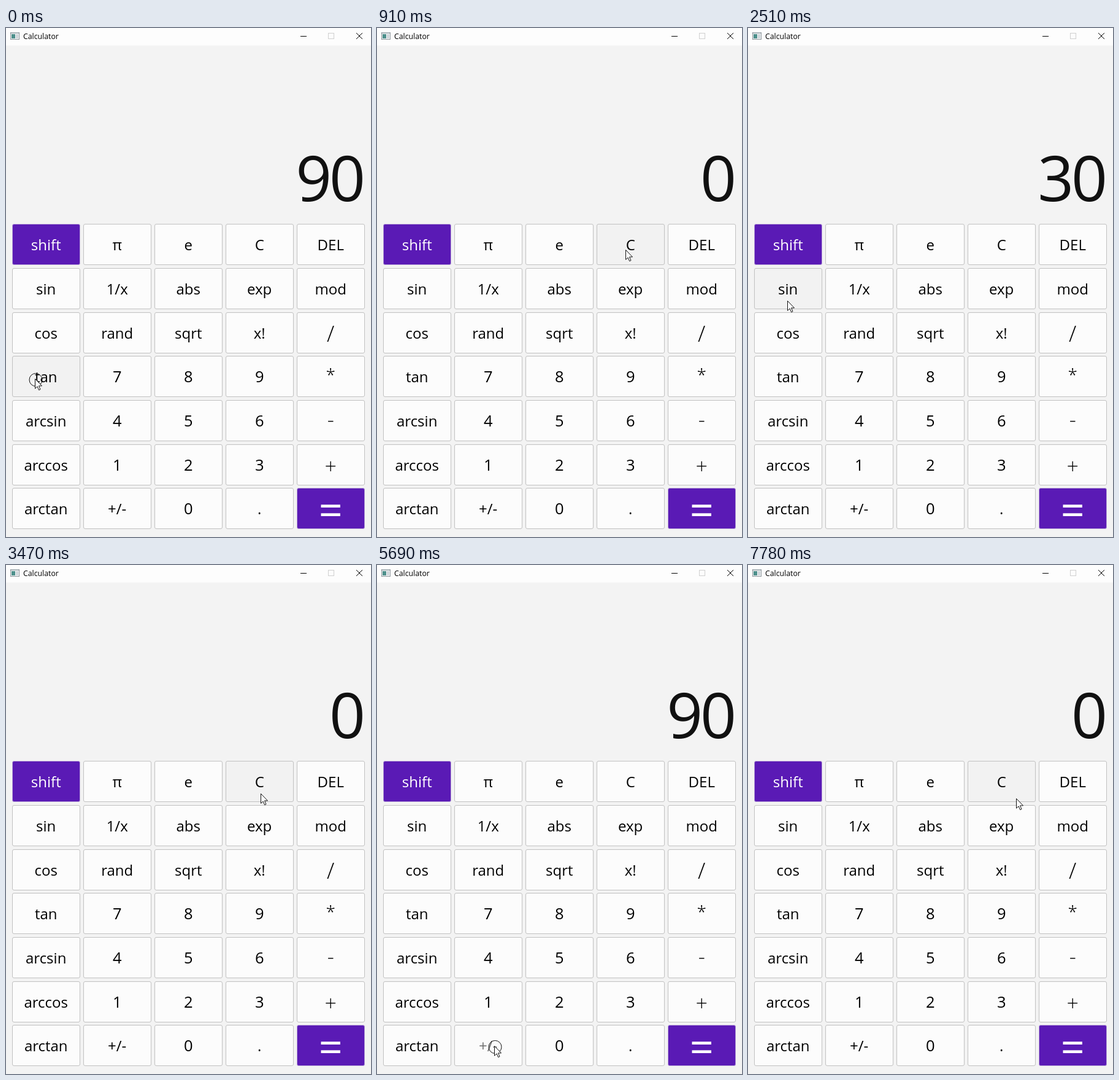
Recreate the animation shown at these times as an HTML page. Size 595 px wide and 829 px high, loop 8000 ms.

```html
<!DOCTYPE html>
<html lang="en">
<head>
<meta charset="utf-8">
<title>Calculator</title>
<style>
  html, body { margin: 0; width: 100%; height: 100%; overflow: hidden; background: #f3f3f3; }
  svg { display: block; width: 595px; height: 829px; font-family: "Open Sans", "Noto Sans", sans-serif; }
  .key rect { fill: #fcfcfc; stroke: #c1c1c1; }
  .key text { fill: #000; font-size: 24px; text-anchor: middle; }
  .key .digit { font-size: 25.5px; }
  .key .op { font-weight: 300; }
  .key.hover rect { fill: #f2f2f2; }
  .key.down rect { fill: #fbfbfb; }
  .key.down text { fill: #737373; }
  .key.accent rect { fill: #5a1ab5; stroke: #b9a3d8; }
  .key.accent text { fill: #fff; font-weight: 400; }
  .key.off text { fill: #a0a0a0; }
  .key.accent.off rect { fill: #cdcdcd; stroke: #cdcdcd; }
  .key.accent.off text { fill: #fff; }
  #display { fill: #111; font-size: 103px; letter-spacing: -4px; text-anchor: end; }
</style>
</head>
<body>
<svg viewBox="0 0 595 829">
  <rect width="595" height="829" fill="#f3f3f3"/>
  <rect width="595" height="28.5" fill="#fdfdfd"/>
  <g>
    <rect x="7.5" y="7.5" width="14" height="11" fill="#f4f6f7" stroke="#8b9499"/>
    <rect x="8" y="7" width="13" height="2" fill="#a9b3b8"/>
    <rect x="9" y="10" width="6" height="7" fill="#4d8f8b"/>
    <rect x="16" y="10" width="4" height="7" fill="#cfd6da"/>
  </g>
  <text x="28" y="18" font-size="12.3">Calculator</text>
  <g fill="none" stroke="#000">
    <path d="M480 13.5h10"/>
    <rect x="525.5" y="8.5" width="9" height="9" stroke="#d0d0d0"/>
    <path d="M571 8l10 10m0-10l-10 10"/>
  </g>
  <text id="display" x="582" y="282"></text>
  <g id="keys"></g>
  <circle id="ring" r="10.5" fill="none" stroke="#111"/>
  <path id="pointer" d="M.5 .5V16.2L4.1 12.9 6.6 18.7 9 17.6 6.5 11.9H11.5Z" fill="#fff" stroke="#111"/>
</svg>
<script>
const LOOP = 8000, TICK = 120, ERROR = "Error";
const ROWS = [
  "shift π e C DEL", "sin 1/x abs exp mod", "cos rand sqrt x! /", "tan 7 8 9 *",
  "arcsin 4 5 6 -", "arccos 1 2 3 +", "arctan +/- 0 . ="
];
// Operators: font size, baseline below the key's top
const OPS = { "/": [36, 47], "*": [28, 40], "-": [36, 44], "+": [34, 47], "=": [69, 60] };
const ALWAYS_ON = /^(\d|shift|π|e|C|DEL)$/;

// Pointer stops: leave, arrive, x, y, key pressed there, pause before the press
const STOPS = [
  [0, 0, 47, 571, "tan"],
  [550, 790, 405, 361, "C"],
  [1220, 1700, 372, 701, "3"],
  [1850, 2120, 301, 775, "0"],
  [2270, 2510, 64, 444, "sin", 20],
  [2960, 3320, 415, 372, "C"],
  [3590, 4010, 507, 631],
  [4160, 4550, 249, 699],
  [4700, 4700, 385, 584, "9", TICK],
  [4940, 5180, 295, 769, "0"],
  [5450, 5690, 191, 783, "+/-"],
  [5960, 6350, 54, 499, "cos"],
  [7060, 7780, 437, 380]
];

const $ = id => document.getElementById(id);
function add(parent, tag, attrs) {
  const el = document.createElementNS("http://www.w3.org/2000/svg", tag);
  for (const name in attrs) el.setAttribute(name, attrs[name]);
  return parent.appendChild(el);
}

const keys = ROWS.flatMap((line, row) => line.split(" ").map((label, col) => {
  const x = 10.5 + 116 * col, y = 319.5 + Math.round(71.7 * row + .15);
  const accent = label === "shift" || label === "=";
  const el = add($("keys"), "g", {});
  add(el, "rect", { x, y, width: 110, height: 66, rx: 2.5 });
  const [size, base] = OPS[label] || [0, 42.5];
  const kind = size ? "op" : /^\d$/.test(label) ? "digit" : "";
  const text = add(el, "text", { x: x + 54.7, y: y + base, class: kind });
  if (size) text.style.fontSize = size + "px";
  text.textContent = label;
  return { el, x, y, label, accent };
}));

// The calculator itself, working in degrees
function press(value, key) {
  if (key === "C") return "0";
  if (key === "+/-") return String(-value);
  if (/\d/.test(key)) return value === "0" ? key : value + key;
  const angle = value * Math.PI / 180;
  if (key === "tan" && Math.abs(Math.cos(angle)) < 1e-9) return ERROR;
  return String(Math.round(Math[key](angle) * 1e9) / 1e9);
}

let shown = "90";
const presses = STOPS.filter(stop => stop[4]).map(([, arrive, , , key, pause = 0]) => {
  const from = arrive + pause;
  return { key, from, to: from + TICK, value: shown = press(shown, key) };
});

// The screen refreshes once per tick, so the eased path is sampled in steps
function pointerAt(t) {
  let [, , x, y] = STOPS[0];
  for (const [leave, arrive, toX, toY] of STOPS) {
    if (t < leave) break;
    const n = Math.floor((arrive - leave) / TICK) + 1;
    const k = Math.min(n, Math.floor((t - leave) / TICK) + 1) / n;
    const eased = 1 - (1 - k) ** 3;
    x += (toX - x) * eased;
    y += (toY - y) * eased;
  }
  return [Math.round(x), Math.round(y)];
}

function render(t) {
  const [px, py] = pointerAt(t);
  const [hx, hy] = pointerAt(t - TICK); // hover trails by one tick
  const active = presses.find(p => t >= p.from && t < p.to);
  const done = presses.filter(p => t >= p.to).pop();
  const value = done ? done.value : "90";
  $("display").textContent = value;
  $("pointer").setAttribute("transform", `translate(${px} ${py})`);
  $("ring").setAttribute("transform", `translate(${px + 1.5} ${py + 2})`);
  $("ring").style.display = active ? "" : "none";
  for (const { el, x, y, label, accent } of keys) {
    const over = hx >= x && hx <= x + 110 && hy >= y && hy <= y + 66;
    const down = over && active && active.key === "+/-";
    const off = value === ERROR && !ALWAYS_ON.test(label);
    const states = { accent, hover: over && !down, down, off };
    el.setAttribute("class", ["key", ...Object.keys(states).filter(s => states[s])].join(" "));
  }
}

const begin = performance.now();
function frame() {
  render((performance.now() - begin) % LOOP);
  requestAnimationFrame(frame);
}
frame();
</script>
</body>
</html>
```
